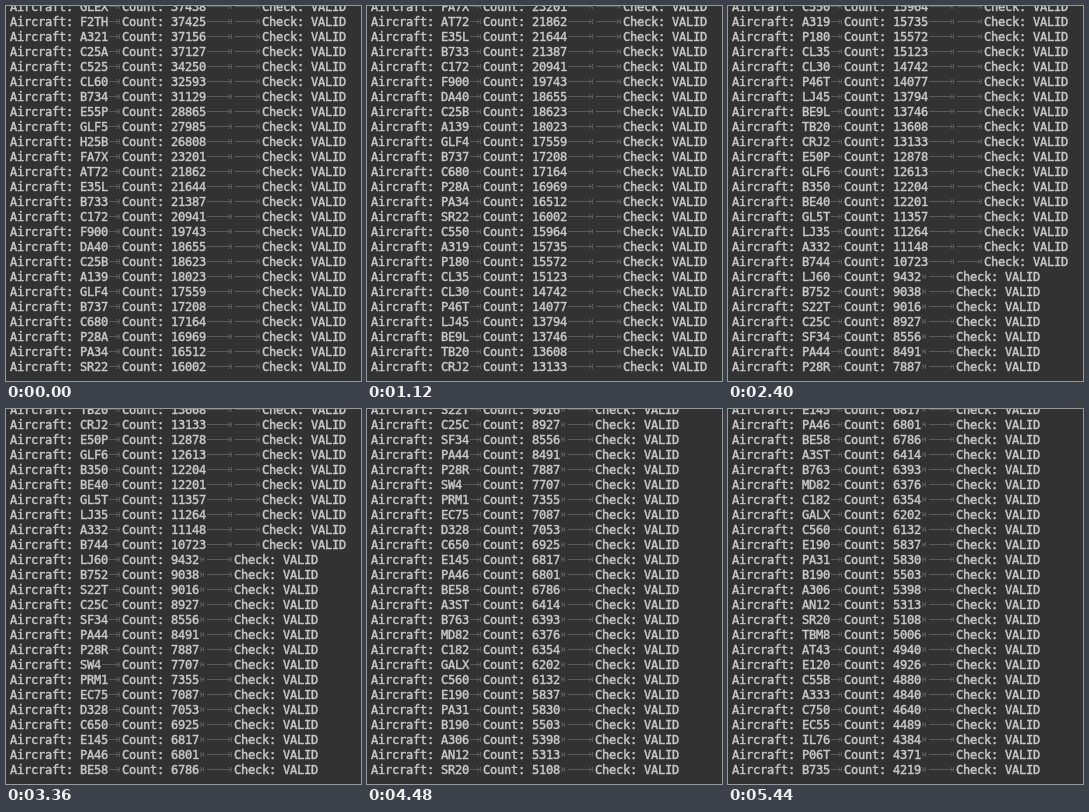
Animation of 355x375 px, one loop 5600 ms. Source, as an HTML page:

```html
<!DOCTYPE html>
<html lang="en">
<head>
<meta charset="utf-8">
<title>Aircraft counts</title>
<style>
  html, body { margin: 0; width: 100%; height: 100%; overflow: hidden; background: #323232; }
  svg { display: block; }
  text {
    font: 12px "DejaVu Sans Mono", monospace;
    letter-spacing: -0.2246px; /* 7px per character */
    fill: #c8c8c8; stroke: #c8c8c8; stroke-width: .45px;
    white-space: pre;
  }
  path { fill: none; stroke: #5a5a5a; stroke-width: 1; }
</style>
</head>
<body>
<!-- Ends below the last full line, so the next one stays hidden -->
<svg width="355" height="369"><g id="log"></g></svg>
<script>
const ROWS = `
  GLEX 37438, F2TH 37425, A321 37156, C25A 37127, C525 34250, CL60 32593, B734 31129, E55P 28865,
  GLF5 27985, H25B 26808, FA7X 23201, AT72 21862, E35L 21644, B733 21387, C172 20941, F900 19743,
  DA40 18655, C25B 18623, A139 18023, GLF4 17559, B737 17208, C680 17164, P28A 16969, PA34 16512,
  SR22 16002, C550 15964, A319 15735, P180 15572, CL35 15123, CL30 14742, P46T 14077, LJ45 13794,
  BE9L 13746, TB20 13608, CRJ2 13133, E50P 12878, GLF6 12613, B350 12204, BE40 12201, GL5T 11357,
  LJ35 11264, A332 11148, B744 10723, LJ60 9432, B752 9038, S22T 9016, C25C 8927, SF34 8556,
  PA44 8491, P28R 7887, SW4 7707, PRM1 7355, EC75 7087, D328 7053, C650 6925, E145 6817,
  PA46 6801, BE58 6786, A3ST 6414, B763 6393, MD82 6376, C182 6354, GALX 6202, C560 6132,
  E190 5837, PA31 5830, B190 5503, A306 5398, AN12 5313, SR20 5108, TBM8 5006, AT43 4940,
  E120 4926, C55B 4880, A333 4840, C750 4640, EC55 4489, IL76 4384, P06T 4371, B735 4219`
  .split(',').map(row => row.trim().split(' '));

const LINE = 15, TICK = 160, TAB = 4;
// Lines printed at each tick
const ADVANCE = [...'00222202222022320220222302302022222'].map(Number);

const colX = col => 4 + 7 * col;

function renderRow([type, count], index) {
  const base = 5 + LINE * index, mid = base - 4.5;
  let col = 0, out = '';
  const text = str => {
    out += `<text x="${colX(col)}" y="${base}">${str}</text>`;
    col += str.length;
  };
  const tab = () => {
    const from = colX(col);
    col = (Math.floor(col / TAB) + 1) * TAB;
    const to = colX(col);
    out += `<path d="M${from + 1} ${mid}H${to - 3}M${to - 6} ${mid - 2.5}l2.5 2.5l-2.5 2.5M${to - 2.5} ${mid - 2.5}v5"/>`;
  };
  text('Aircraft: ' + type);
  tab();
  text('Count: ' + count);
  tab();
  tab();
  text('Check: VALID');
  return out;
}

const log = document.getElementById('log');
log.innerHTML = ROWS.map(renderRow).join('');

function draw() {
  const tick = Math.floor(performance.now() / TICK) % ADVANCE.length;
  const top = ADVANCE.slice(0, tick + 1).reduce((sum, n) => sum + n, 0);
  log.setAttribute('transform', `translate(0 ${-LINE * top})`);
  requestAnimationFrame(draw);
}
draw();
</script>
</body>
</html>
```
